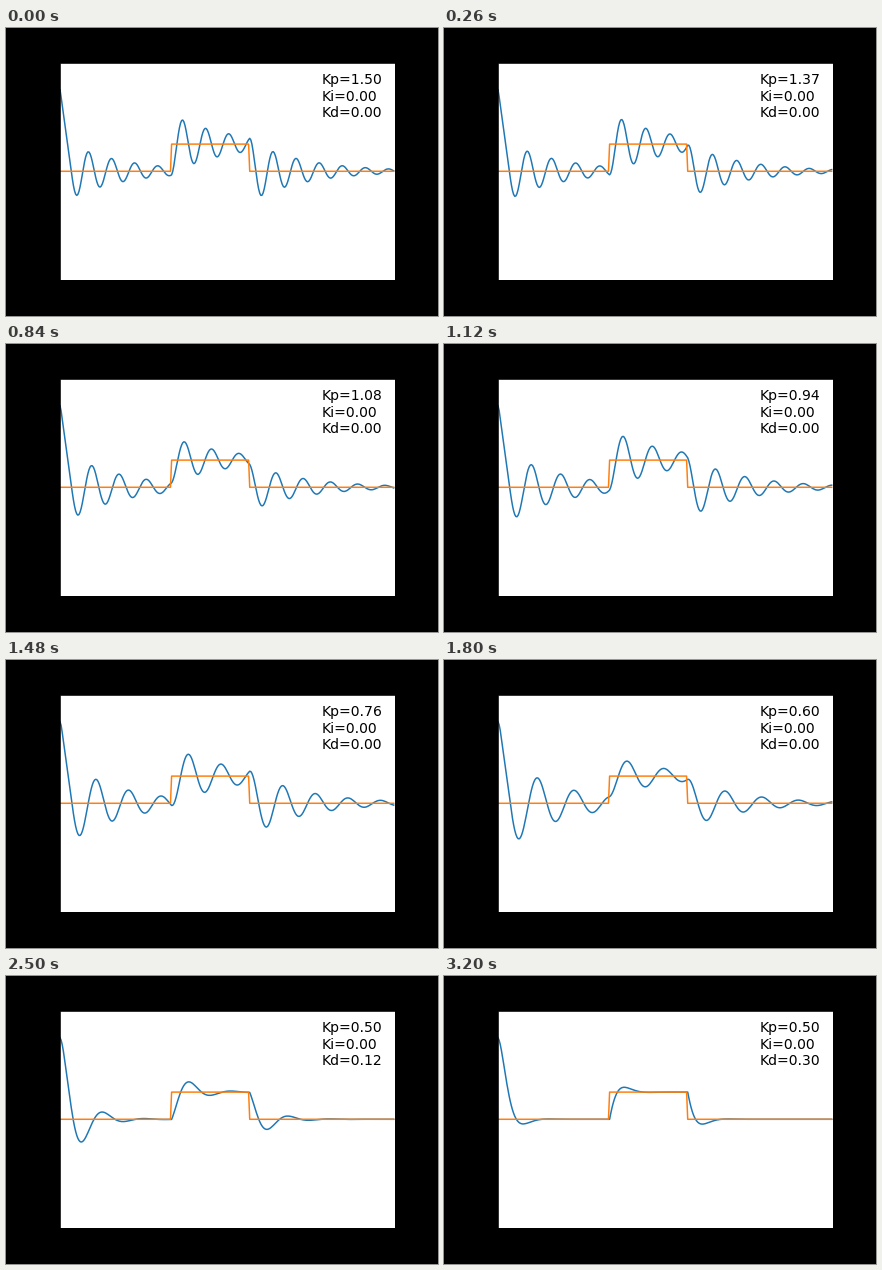
Recreate the animation shown at these times as a matplotlib script. Size 432 by 288 pixels, loop 5000 ms.

```python
import matplotlib.pyplot as plt
import numpy as np
from matplotlib.animation import FuncAnimation

FRAMES, INTERVAL = 250, 20
STEPS, DT = 300, 0.1
GAIN, DRAG, MAX_SPEED = 6.0, 0.4, 3.0
START = 3.0

time = np.arange(STEPS) * DT
target = np.zeros(STEPS)
target[100:170] = 1.0


def gains(frame):
    """Lower Kp first, then raise Kd, then hold."""
    kp = 1.5 - 0.01 * min(frame, 100)
    kd = 0.005 * min(max(frame - 100, 0), 60)
    return kp, 0.0, kd


def simulate(kp, ki, kd):
    pos, speed, total = START, 0.0, 0.0
    last = target[0] - pos
    path = np.empty(STEPS)
    for i in range(STEPS):
        path[i] = pos
        err = target[i] - pos
        total += err * DT
        power = kp * err + ki * total + kd * (err - last) / DT
        last = err
        speed += (GAIN * power - DRAG * speed) * DT
        speed = min(max(speed, -MAX_SPEED), MAX_SPEED)
        pos += speed * DT
    return path


fig = plt.figure(figsize=(6, 4), dpi=72, facecolor="black")
ax = fig.add_axes([0.125, 0.125, 0.775, 0.755])
ax.set(xlim=(0, STEPS * DT), ylim=(-4, 4), xticks=[], yticks=[])
response, = ax.plot(time, simulate(*gains(0)), color="#1f77b4", lw=1.5)
ax.plot(time, target, color="#ff7f0e", lw=1.5)
label = ax.text(0.78, 0.95, "", transform=ax.transAxes, va="top",
                fontsize=14, family="DejaVu Sans", color="black")


def update(frame):
    kp, ki, kd = gains(frame)
    response.set_ydata(simulate(kp, ki, kd))
    label.set_text(f"Kp={kp:.2f}\nKi={ki:.2f}\nKd={kd:.2f}")
    return response, label


anim = FuncAnimation(fig, update, frames=FRAMES, interval=INTERVAL,
                     repeat=True, repeat_delay=0)
plt.show()
```
